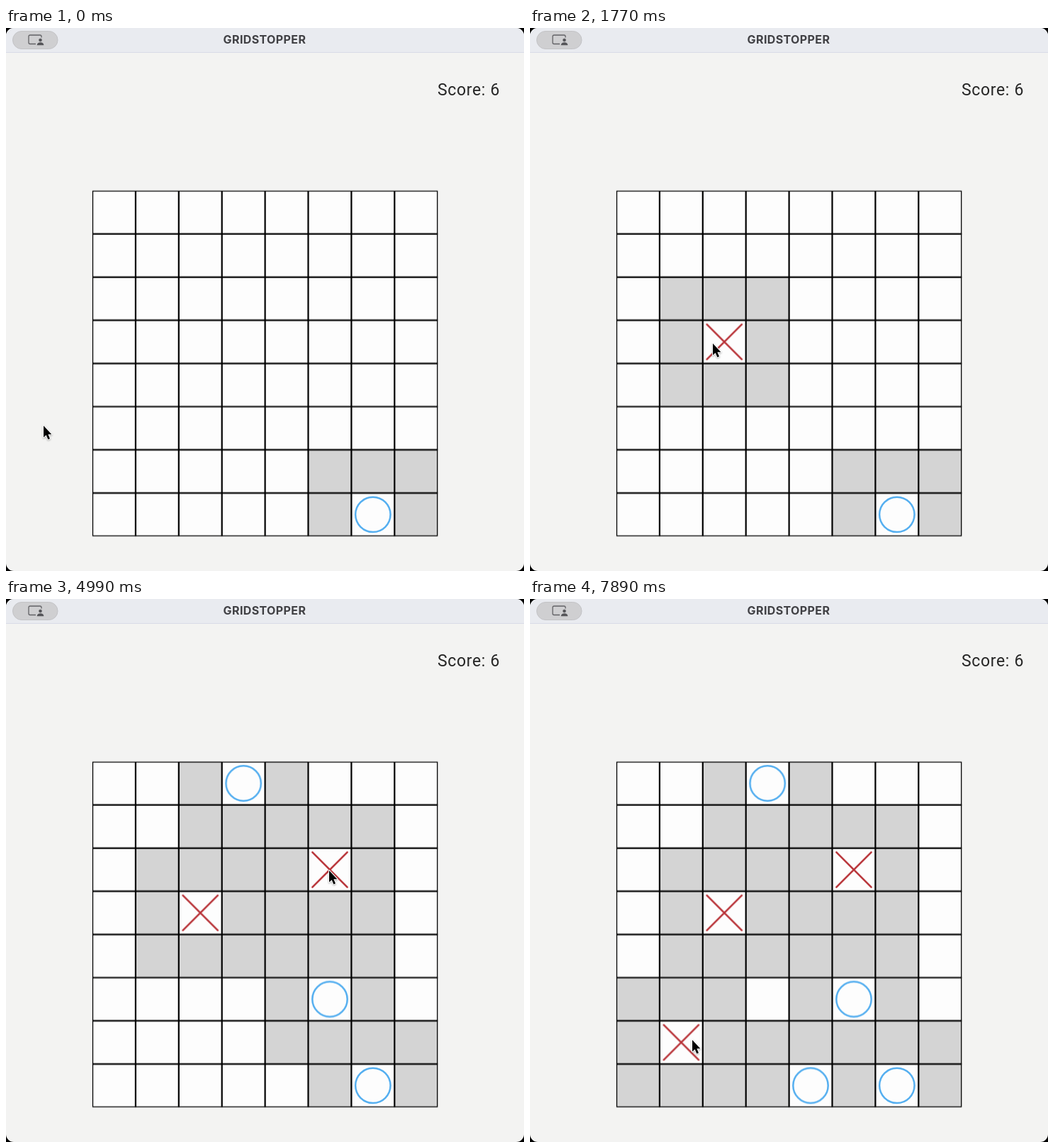
Write an HTML page that moves like this. It is 731 by 766 pixels and loops after 8 s.

```html
<!DOCTYPE html>
<html lang="en">
<head>
<meta charset="utf-8">
<title>Gridstopper</title>
<style>
  html, body { margin: 0; width: 100%; height: 100%; overflow: hidden; background: #000; }
  svg { display: block; width: 731px; height: 766px; }
  .title { font: 700 16px Inter, sans-serif; letter-spacing: .4px; fill: #404044; }
  .score { font: 400 23px Roboto, sans-serif; letter-spacing: .65px; fill: #262626; }
  .o { fill: none; stroke: #55aff0; stroke-width: 2.5; }
  .x { fill: none; stroke: #b93439; stroke-width: 2.6; stroke-linecap: round; }

  /* Moves appear at once and stay until the loop restarts */
  .move { animation: 8s step-end infinite; }
  #m1 { animation-name: m1; }
  #m2 { animation-name: m2; }
  #m3 { animation-name: m3; }
  #m4 { animation-name: m4; }
  #m5 { animation-name: m5; }
  #m6 { animation-name: m6; }
  @keyframes m1 { 0% { opacity: 0 } 22.125% { opacity: 1 } }
  @keyframes m2 { 0% { opacity: 0 } 30.375% { opacity: 1 } }
  @keyframes m3 { 0% { opacity: 0 } 54.25% { opacity: 1 } }
  @keyframes m4 { 0% { opacity: 0 } 62.375% { opacity: 1 } }
  @keyframes m5 { 0% { opacity: 0 } 90.375% { opacity: 1 } }
  @keyframes m6 { 0% { opacity: 0 } 98.625% { opacity: 1 } }

  /* Each trip speeds up to a waypoint, then slows onto the chosen cell */
  #cursor {
    --go: cubic-bezier(.4, 0, .7, .8);
    --land: cubic-bezier(.3, .5, .6, 1);
    animation: travel 8s linear infinite;
  }
  @keyframes travel {
    0% { transform: translate(53px, 561px) }
    .625% { transform: translate(53px, 561px); animation-timing-function: var(--go) }
    15.75% { transform: translate(228px, 462px); animation-timing-function: var(--land) }
    22.125% { transform: translate(258px, 445px) }
    41.375% { transform: translate(258px, 445px); animation-timing-function: var(--go) }
    49% { transform: translate(405px, 403px); animation-timing-function: var(--land) }
    54.25% { transform: translate(456px, 383px) }
    71.75% { transform: translate(456px, 383px); animation-timing-function: var(--go) }
    85.75% { transform: translate(258px, 598px); animation-timing-function: var(--land) }
    90.375%, 100% { transform: translate(229px, 622px) }
  }
</style>
</head>
<body>
<svg viewBox="0 0 731 766">
  <defs>
    <clipPath id="window"><rect width="731" height="766" rx="11"/></clipPath>
    <clipPath id="board"><rect width="487.2" height="487.2"/></clipPath>
    <g id="zone">
      <path d="M-91.35 -91.35h182.7v182.7h-182.7z" fill="#d4d4d4"/>
      <path d="M-30.45 -30.45h60.9v60.9h-60.9z" fill="#fdfdfd"/>
    </g>
    <g id="O"><use href="#zone"/><circle class="o" r="24.7"/></g>
    <g id="X"><use href="#zone"/><path class="x" d="M-24.6 -24.6L24.6 24.6M24.6 -24.6L-24.6 24.6"/></g>
  </defs>

  <g clip-path="url(#window)">
    <rect width="731" height="766" fill="#f3f3f2"/>
    <rect width="731" height="34" fill="#e9ebf0"/>
    <rect y="34" width="731" height="1" fill="#d8dbe7"/>
  </g>

  <rect x="9.5" y="4.5" width="63.5" height="25" rx="12.5" fill="#cfcfd1" stroke="#c3c3c6"/>
  <path d="M42 22.5H34a2 2 0 0 1-2-2V12a2 2 0 0 1 2-2H48a2 2 0 0 1 2 2v1.5" fill="none" stroke="#626266" stroke-width="1.3"/>
  <circle cx="48.5" cy="17" r="2.3" fill="#555559"/>
  <path d="M43.7 24.2c0-5.4 9.6-5.4 9.6 0z" fill="#555559"/>

  <text class="title" x="365" y="22" text-anchor="middle">GRIDSTOPPER</text>
  <text class="score" x="609" y="95">Score: 6</text>

  <g transform="translate(122 229.6)">
    <rect width="487.2" height="487.2" fill="#fdfdfd"/>
    <!-- Marks sit at cell centres, 60.9 px apart -->
    <g clip-path="url(#board)">
      <use href="#O" x="395.85" y="456.75"/>
      <use class="move" id="m1" href="#X" x="152.25" y="213.15"/>
      <use class="move" id="m2" href="#O" x="213.15" y="30.45"/>
      <use class="move" id="m3" href="#X" x="334.95" y="152.25"/>
      <use class="move" id="m4" href="#O" x="334.95" y="334.95"/>
      <use class="move" id="m5" href="#X" x="91.35" y="395.85"/>
      <use class="move" id="m6" href="#O" x="273.98" y="456.75"/>
    </g>
    <g fill="none" stroke="#000">
      <path stroke-width="2.2" d="M60.9 0v487.2m60.9 0v-487.2m60.9 0v487.2m60.9 0v-487.2m60.9 0v487.2m60.9 0v-487.2m60.9 0v487.2M0 60.9h487.2m0 60.9h-487.2m0 60.9h487.2m0 60.9h-487.2m0 60.9h487.2m0 60.9h-487.2m0 60.9h487.2"/>
      <rect x=".5" y=".5" width="486.2" height="486.2" stroke-width="1.3"/>
    </g>
  </g>

  <g id="cursor">
    <path d="M0 0V16.6L3.7 13.2L6.4 19.4L9 18.2L6.4 12.2H11.4Z" fill="#000" stroke="#fff" stroke-width="2" stroke-linejoin="round" paint-order="stroke" style="filter: drop-shadow(0 1px 1px rgba(0, 0, 0, .3))"/>
  </g>
</svg>
</body>
</html>
```
